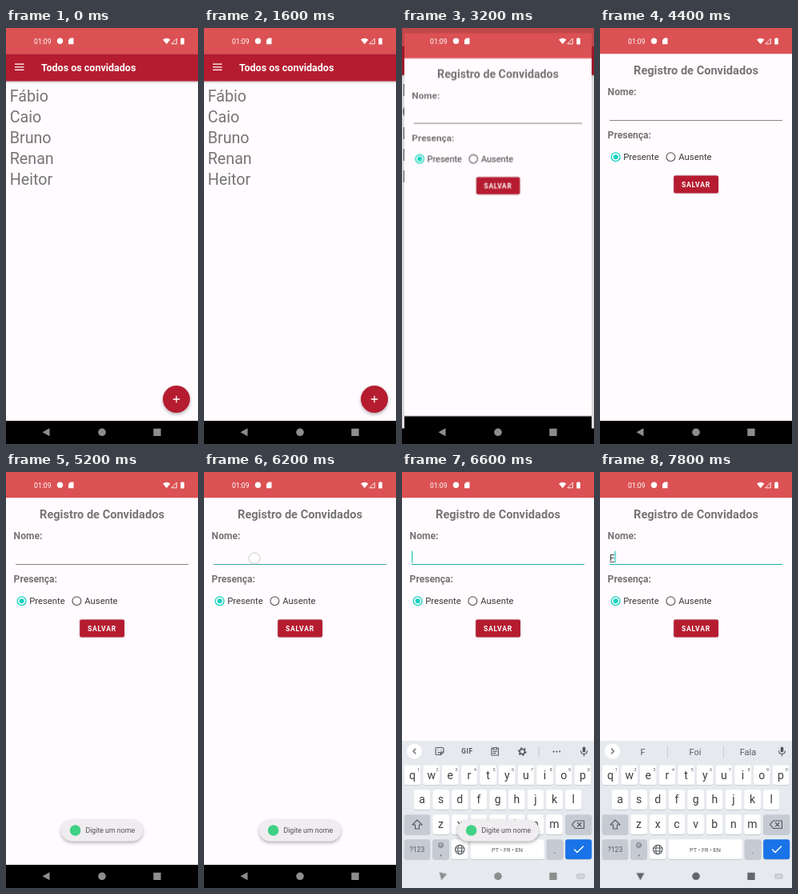
Write an HTML page that moves like this. It is 240 px wide and 520 px high and loops after 8 s.

```html
<!DOCTYPE html>
<html lang="pt">
<head>
<meta charset="utf-8">
<title>Convidados</title>
<style>
html, body { margin: 0; width: 100%; height: 100%; overflow: hidden; background: #000; }
svg { display: block; width: 240px; height: 520px; font-family: Roboto, "Noto Sans", sans-serif; }
.b { font-weight: 700; }
.c { text-anchor: middle; }
.gray { fill: #767476; }
.line { fill: none; stroke: currentColor; stroke-width: 1.1; stroke-linecap: round; stroke-linejoin: round; }
.thin { stroke-width: .8; }
.lift { filter: drop-shadow(0 2px 2px rgba(0,0,0,.3)); }
.soft { filter: drop-shadow(0 .7px 1px rgba(0,0,0,.25)); }

/* every part shares one 8 s clock */
.t { animation: 8s linear infinite both; }
.window { transform-origin: 120px 260px; }
#list { animation-name: list; }
#scrim { animation-name: scrim; }
#form { animation-name: form; }
#rule { animation-name: rule; }
#caret { animation-name: caret; }
#typed, #words { animation-name: typed; }
#tools { animation-name: tools; }
#keys { animation-name: keys; }
#navLight, #switcher { animation-name: navLight; }
#nav { animation-name: nav; }
#back { animation-name: back; transform-origin: 50.5px 505.3px; }
#toast { animation-name: toast; }
#tapAdd { animation-name: tapAdd; }
#tapSave { animation-name: tapSave; }
#tapName { animation-name: tapName; }

@keyframes list {
  0%, 38% { transform: scale(1); }
  40% { transform: scale(1.041); }
  42.5%, 100% { transform: scale(1.05); }
}
@keyframes scrim { 0%, 38% { opacity: 0; } 40%, 100% { opacity: .12; } }
@keyframes form {
  0%, 38% { transform: scale(.85); opacity: 0; }
  39% { transform: scale(.94); opacity: 1; }
  40% { transform: scale(.975); opacity: 1; }
  42.5% { transform: scale(.998); opacity: 1; }
  44%, 100% { transform: scale(1); opacity: 1; }
}
@keyframes rule {
  0%, 76.5% { fill: #8b898b; }
  77.5% { fill: #46a6a6; }
  80%, 100% { fill: #1fb5a6; }
}
@keyframes caret {
  0%, 81.2% { opacity: 0; transform: none; }
  81.21%, 87.4% { opacity: 1; transform: none; }
  87.41%, 92.4% { opacity: 0; transform: none; }
  92.41%, 100% { opacity: 1; transform: translateX(6.3px); }
}
@keyframes typed { 0%, 92.4% { opacity: 0; } 92.41%, 100% { opacity: 1; } }
@keyframes tools { 0%, 92.4% { opacity: 1; } 92.41%, 100% { opacity: 0; } }
@keyframes keys {
  0%, 78.75% { transform: translateY(156px); animation-timing-function: cubic-bezier(0, 0, .2, 1); }
  82%, 100% { transform: none; }
}
@keyframes navLight { 0%, 79.4% { opacity: 0; } 80%, 100% { opacity: 1; } }
@keyframes nav { 0%, 82.5% { color: #8d8d8d; } 85%, 100% { color: #63676c; } }
@keyframes back { 0%, 81% { transform: none; } 82.5% { transform: rotate(-76deg); } 84.5%, 100% { transform: rotate(-90deg); } }
@keyframes toast { 0%, 60% { opacity: 0; } 63.5%, 85% { opacity: 1; } 88%, 100% { opacity: 0; } }
@keyframes tapAdd { 0%, 34.9% { opacity: 0; } 35%, 37.4% { opacity: 1; } 38%, 100% { opacity: 0; } }
@keyframes tapSave { 0%, 57.4% { opacity: 0; } 57.5%, 59.4% { opacity: 1; } 60%, 100% { opacity: 0; } }
@keyframes tapName { 0%, 76.9% { opacity: 0; } 77%, 78.4% { opacity: 1; } 79%, 100% { opacity: 0; } }
</style>
</head>
<body>
<svg viewBox="0 0 240 520">
  <defs>
    <clipPath id="aboveNav"><path d="M0 0H240V491H0Z"/></clipPath>
    <linearGradient id="shade" x2="0" y2="1">
      <stop stop-opacity=".22"/><stop offset="1" stop-opacity="0"/>
    </linearGradient>
    <circle id="tap" r="7" fill="#fff" fill-opacity=".45" stroke="#bbb" stroke-opacity=".75"/>
    <g id="page">
      <path d="M0 0H240V520H0Z"/>
      <path d="M0 0H240V491H0Z" fill="#fffbfe"/>
      <path d="M0 0H240V32.3H0Z" fill="#db5154"/>
    </g>
  </defs>

  <g id="list" class="t window">
    <use href="#page"/>
    <path d="M0 32.3H240V66.6H0Z" fill="#b61c30"/>
    <path d="M0 66.6H240V69.5H0Z" fill="url(#shade)"/>
    <path d="M11 45.2H22.5M11 48.8H22.5M11 52.4H22.5" stroke="#fff" stroke-width="1.2"/>
    <text class="b" x="44" y="54.3" font-size="12.5" fill="#fff">Todos os convidados</text>
    <g id="guests" class="gray" font-size="19.7"></g>
    <circle class="lift" cx="213" cy="464" r="17" fill="#b61c30"/>
    <path d="M208.8 464H217.2M213 459.8V468.2" stroke="#fff" stroke-width="1.3"/>
  </g>
  <path id="scrim" class="t" d="M0 0H240V520H0Z"/>

  <g id="form" class="t window">
    <use href="#page"/>
    <g class="b gray">
      <text class="c" x="120" y="57.7" font-size="14.6">Registro de Convidados</text>
      <text x="9.6" y="84.4" font-size="12.1">Nome:</text>
      <text x="9.6" y="138.2" font-size="12.1">Presença:</text>
    </g>
    <rect id="rule" class="t" x="12" y="115" width="216" height="1.1"/>
    <g id="typed" class="t" fill="#333">
      <text x="12" y="111" font-size="11.5">F</text>
      <path d="M12 112H18.5V112.8H12Z"/>
    </g>
    <path id="caret" class="t" d="M12.1 98.8H13.3V113.3H12.1Z" fill="#14c9b4"/>
    <g fill="none" stroke-width="1.3">
      <circle cx="19.6" cy="161.2" r="5.4" stroke="#10d3bd"/>
      <circle cx="88.4" cy="161.2" r="5.4" stroke="#6b696b"/>
    </g>
    <circle cx="19.6" cy="161.2" r="3" fill="#10d3bd"/>
    <g font-size="11.3" fill="#3a383a">
      <text x="29.2" y="165.2">Presente</text>
      <text x="98.3" y="165.2">Ausente</text>
    </g>
    <rect class="soft" x="92.2" y="184.4" width="55.8" height="22.2" rx="2" fill="#b61c30"/>
    <text class="b" x="102" y="198.7" font-size="8.6" letter-spacing=".75" fill="#fff">SALVAR</text>
  </g>

  <path id="navLight" class="t" d="M0 491H240V520H0Z" fill="#e6e9ee"/>
  <g clip-path="url(#aboveNav)">
    <g id="keys" class="t" color="#54585d">
      <path d="M0 336H240V491H0Z" fill="#e6e9ee"/>
      <circle cx="15.5" cy="349" r="9.5" fill="#fff"/>
      <g id="tools" class="t">
        <path class="line" d="M17 346L14 349L17 352"/>
        <path class="line" d="M43.5 344.5H50.5Q52 344.5 52 346V350L48.5 353.5H43.5Q42 353.5 42 352V346Q42 344.5 43.5 344.5M48.5 353.5V350H52M45 350.3Q46.5 351.5 47.5 350.5M45 347.5H45.1M49 347.5H49.1"/>
        <text class="b c" x="81.5" y="352" font-size="8.3" letter-spacing=".6" fill="currentColor">GIF</text>
        <path class="line" d="M113 345H112V354H120.500V345H119.5M114 344.5H118.5V347H114ZM114 349.5H118.5M114 351.5H117"/>
        <g fill="none" stroke="currentColor">
          <circle cx="150.3" cy="349.5" r="3.1" stroke-width="1.5"/>
          <circle cx="150.3" cy="349.5" r="4.5" stroke-width="1.7" pathLength="12" stroke-dasharray="1"/>
        </g>
        <path d="M171 343V356" stroke="#c4c8ce"/>
        <path class="line" d="M189.5 349.5H189.6M193.3 349.5H193.4M197.1 349.5H197.2" style="stroke-width:2"/>
      </g>
      <g id="words" class="t">
        <path class="line" d="M14.3 346L17.3 349L14.3 352"/>
        <path d="M84.5 342V357M154.5 342V357" stroke="#c9cdd3"/>
        <g class="c" font-size="11" fill="#565a5f">
          <text x="53.5" y="353.5">F</text>
          <text x="119" y="353.5">Foi</text>
          <text x="185" y="353.5">Fala</text>
        </g>
      </g>
      <rect x="225.7" y="343.5" width="3.6" height="7" rx="1.8" fill="currentColor"/>
      <path class="line" d="M223.5 348.5Q223.8 352.5 227.5 352.5T231.5 348.5M227.5 352.5V355"/>
      <g id="caps"></g>
      <path class="line" d="M19 435L13 441H16.5V446H21.5V441H25Z"/>
      <path class="line" d="M216.5 436H227.5V445.5H216.5L212.5 440.7ZM219.5 438.5L224 443M224 438.5L219.5 443"/>
      <text class="c" x="19" y="475" font-size="8.5" fill="currentColor">?123</text>
      <circle class="line thin" cx="48.5" cy="466.5" r="3"/>
      <path class="line thin" d="M47 467.3Q48.5 469 50 467.3M47.4 465.5H47.5M49.5 465.5H49.6"/>
      <text class="c" x="48.5" y="479" font-size="11" fill="currentColor">,</text>
      <circle class="line" cx="72.3" cy="472" r="5.7"/>
      <ellipse class="line" cx="72.3" cy="472" rx="2.5" ry="5.7"/>
      <path class="line" d="M67.3 470H77.3M67.3 474H77.3"/>
      <text class="c" x="131.5" y="474.5" font-size="7.3" fill="currentColor">PT • FR • EN</text>
      <text class="c" x="191" y="477" font-size="11" fill="currentColor">.</text>
      <path class="line" d="M215.5 472L219 475.5L226.5 468" style="stroke:#fff;stroke-width:1.5"/>
    </g>
  </g>

  <g id="toast" class="t">
    <rect class="lift" x="69" y="434.5" width="102" height="27" rx="13.5" fill="#f0edf0"/>
    <circle cx="86.6" cy="448" r="6.8" fill="#3fd184"/>
    <text x="99.4" y="451.2" font-size="8.8" fill="#525052">Digite um nome</text>
  </g>

  <g id="tapAdd" class="t"><use href="#tap" x="213" y="464"/></g>
  <g id="tapSave" class="t"><use href="#tap" x="120" y="196"/></g>
  <g id="tapName" class="t"><use href="#tap" x="63" y="108"/></g>

  <g fill="#fff">
    <text x="35" y="20" font-size="8.7">01:09</text>
    <circle cx="67.5" cy="16.3" r="3.7"/>
    <path d="M80.5 12.5H84.5V20.3H78V15Z"/>
    <path d="M196 14.5Q200.7 10.8 205.4 14.5L200.7 20.3Z"/>
    <path d="M213.3 13.2V19.8H206.8Z" fill="none" stroke="#fff" stroke-width=".9"/>
    <path d="M219.5 12.2H221.5V13H222.8V20.5H218.2V13H219.5Z"/>
  </g>

  <g id="nav" class="t" fill="currentColor">
    <path id="back" class="t" d="M45.5 505.3L54.5 500.3V510.3Z"/>
    <circle cx="120" cy="505.3" r="4.8"/>
    <rect x="184.3" y="500.7" width="9.3" height="9.3" rx=".5"/>
  </g>
  <g id="switcher" class="t" fill="none" stroke="#a3a7ac">
    <rect x="218.8" y="502.7" width="9" height="5.3" rx=".8" stroke-width=".8"/>
    <path d="M220 504.4H227M220 506.2H227" stroke-dasharray="1 .8"/>
  </g>
</svg>
<script>
const NS = "http://www.w3.org/2000/svg";
const caps = document.getElementById("caps");
const guests = document.getElementById("guests");

function add(parent, tag, attrs, text = "") {
  const el = document.createElementNS(NS, tag);
  for (const name in attrs) el.setAttribute(name, attrs[name]);
  el.textContent = text;
  parent.append(el);
}

function key(x, y, width, fill = "#fff") {
  const box = { x, width, height: 24.8, rx: 3 };
  add(caps, "rect", { ...box, y: y + 0.7, fill: "#bcc0c6" });
  add(caps, "rect", { ...box, y, fill });
}

["Fábio", "Caio", "Bruno", "Renan", "Heitor"].forEach((name, i) =>
  add(guests, "text", { x: 4.7, y: 92 + 26 * i }, name));

const PITCH = 23.65, DARK = "#c6cbd3";
[["qwertyuiop", 13, 366.5], ["asdfghjkl", 25, 397.3], ["zxcvbnm", 48.6, 428.2]].forEach(([row, left, y]) => {
  [...row].forEach((letter, i) => {
    const x = left + PITCH * i;
    key(x - 10.4, y, 20.8);
    add(caps, "text", { x, y: y + 17, class: "c", "font-size": 14, fill: "#3a3d41" }, letter);
    if (row.length === 10)
      add(caps, "text", { x: x + 7.5, y: y + 7, class: "c", "font-size": 5.8, fill: "#5c6066" }, (i + 1) % 10);
  });
});
key(2.8, 428.2, 32.4, DARK);
key(204.2, 428.2, 33, DARK);
[[2.8, 32.4, DARK], [38.1, 20.8, DARK], [61.8, 20.8], [85.4, 92.4], [180.7, 20.8, DARK], [204.2, 33, "#1a73e8"]]
  .forEach(([x, width, fill]) => key(x, 459.2, width, fill));
</script>
</body>
</html>
```
